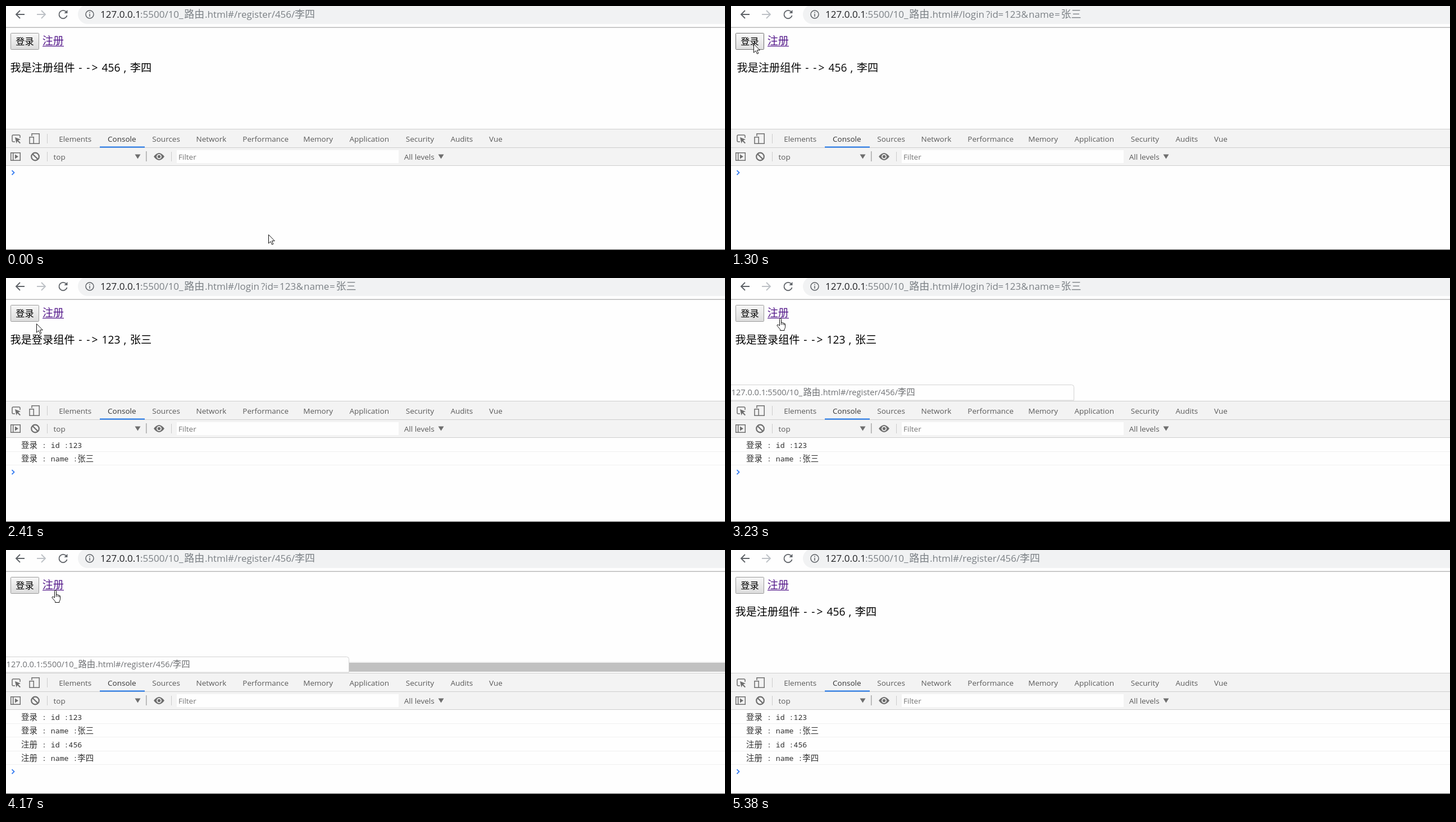
These frames come from a looping animation (1280x435 px, 5660 ms). An HTML page:

```html
<!DOCTYPE html>
<html lang="zh">
<head>
<meta charset="utf-8">
<title>路由</title>
<style>
html, body { margin: 0; width: 100%; height: 100%; overflow: hidden; background: #fefefe; }
svg { display: block; width: 1280px; height: 435px; }
text { font: 13.5px "Open Sans", "Noto Sans CJK SC", "Noto Sans CJK", sans-serif; fill: #5a5a5a; white-space: pre; }
text.zh { font-family: "Noto Sans CJK SC", "Noto Sans CJK", sans-serif; }
.url text { font-size: 17px; fill: #7b8085; }
.url .zh { font-size: 18px; }
.url .host { fill: #202124; }
#status text { fill: #6f7174; }
.page text { font-size: 19.2px; fill: #000; }
.log text { font: 13.2px "Noto Sans Mono", "Noto Sans CJK SC", monospace; fill: #303030; }
.log .zh { font-size: 14.4px; }
.icon { fill: none; stroke: #5f6368; stroke-width: 1.5; }
.tools { stroke: #6e6e6e; }
.solid { fill: #6e6e6e; }
.icon .solid { stroke: none; }
.sep { fill: #ccc; }
#button rect { fill: url(#idle); stroke: #9a9a9a; }
#button.hover rect { fill: url(#hover); stroke: #6f6f6f; }
#button.press rect { fill: url(#press); stroke: #6f6f6f; }
#button text { font-size: 16.2px; fill: #000; }
#link { fill: #551a8b; }
#link.press { fill: #f00; }
#link text { font-size: 19.2px; fill: inherit; }
.pointer { fill: #fff; stroke: #111; stroke-linejoin: round; }
.off { display: none; }
</style>
</head>
<body>
<svg viewBox="0 0 1280 435">
  <defs>
    <linearGradient id="idle" x2="0" y2="1"><stop stop-color="#f7f7f7"/><stop offset="1" stop-color="#dcdcdc"/></linearGradient>
    <linearGradient id="hover" x2="0" y2="1"><stop stop-color="#fafafa"/><stop offset="1" stop-color="#dedede"/></linearGradient>
    <linearGradient id="press" x2="0" y2="1"><stop stop-color="#d8d8d8"/><stop offset="1" stop-color="#f0f0f0"/></linearGradient>
  </defs>
  <rect width="1280" height="435" fill="#fefefe"/>

  <!-- browser bar -->
  <rect x="128" y="-2" width="1300" height="34" rx="17" fill="#f1f2f3"/>
  <rect y="37.5" width="1280" height="1.5" fill="#b9b9b9"/>
  <g class="icon">
    <path d="M33 15H18M25 8l-7 7 7 7" style="stroke-width:1.9"/>
    <path d="M55 15H70M63 8l7 7-7 7" style="stroke:#bdc1c6;stroke-width:1.9"/>
    <path d="M107 10.2A7.2 7.2 0 1 0 108.6 17" style="stroke-width:1.9"/>
    <path d="M109.5 7v6h-6z" style="fill:#5f6368;stroke:none"/>
    <circle cx="149" cy="15" r="7"/>
    <path d="M149 14v5M149 10.8v1.8"/>
  </g>
  <g id="barRegister" class="url"></g>
  <g id="barLogin" class="url"></g>

  <!-- page -->
  <g id="button">
    <rect x="8.5" y="48.5" width="50" height="29" rx="1"/>
    <text class="zh" x="17.3" y="69">登录</text>
  </g>
  <g id="link">
    <text class="zh" x="64.7" y="69">注册</text>
    <rect x="65" y="71" width="38" height="1.2"/>
  </g>
  <g id="panel" class="page">
    <text id="title" class="zh" x="7.5" y="117">我是注册组件</text>
    <text x="129.3" y="117">-</text>
    <text x="143.3" y="117">-</text>
    <text x="152.6" y="117">&gt;</text>
    <text id="number" x="170.5" y="117">456</text>
    <text x="209.5" y="117">,</text>
    <text id="person" class="zh" x="220.8" y="117">李四</text>
  </g>
  <g id="scrollbar">
    <rect y="199" width="1280" height="18" fill="#f1f1f1"/>
    <rect x="18" y="201" width="1262" height="16" fill="#c1c1c1"/>
    <path d="M11 204v10l-5-5z" fill="#a0a0a0"/>
  </g>
  <g id="status">
    <path d="M-1 190.5H606.5Q610.5 190.5 610.5 194.5V218H-1z" fill="#fefefe" stroke="#d2d2d2"/>
    <g id="bubble" class="url" transform="translate(-143.2 191.2) scale(.856)"></g>
  </g>

  <!-- developer tools -->
  <rect y="219" width="1280" height="66" fill="#f3f3f3"/>
  <path d="M0 219.5H1280M0 252.5H1280M0 284.5H1280" stroke="#cecece"/>
  <rect x="167" y="250.5" width="80" height="2" fill="#1a73e8"/>
  <g id="tabs"></g>
  <g class="icon tools">
    <path d="M16 242H13Q11 242 11 240V232Q11 230 13 230H23Q25 230 25 232V235"/>
    <path class="solid" d="M16 234l10 4-4.2 1.6L26 244l-1.5 1.3-4.2-4.3L18.5 245z"/>
    <path d="M46 232V227.8H59.2V245.2H50M42 233.8H49.2V245.2H42z"/>
    <path d="M8.7 261.7H25.3V275.3H8.7zM12.7 262V275"/>
    <path class="solid" d="M16 264.5v8l6-4z"/>
    <g style="stroke-width:2.2"><circle cx="52" cy="268.5" r="6.8"/><path d="M47.2 263.7l9.6 9.6"/></g>
  </g>
  <g class="sep">
    <rect x="73" y="228" width="1" height="17"/>
    <rect x="73" y="260" width="1" height="17"/>
    <rect x="249" y="259" width="1.5" height="18" fill="#aaa"/>
    <rect x="294" y="260" width="1" height="17"/>
  </g>
  <g class="solid">
    <path d="M229.5 264.5h10l-5 8z"/>
    <path d="M769.5 264.5h10l-5 8z"/>
    <path d="M263 268.5Q272.5 255.5 282 268.5 272.5 281.5 263 268.5z"/>
    <circle cx="272.5" cy="268.5" r="4.4" fill="#f3f3f3"/>
    <circle cx="272.5" cy="268.5" r="2.7"/>
  </g>
  <text x="84.5" y="273.5">top</text>
  <rect x="304" y="257" width="395" height="23" fill="#fefefe"/>
  <text x="307" y="274" style="fill:#757575">Filter</text>
  <text x="708.8" y="273.5">All levels</text>
  <g id="logs" class="log"></g>
  <path id="prompt" d="M10.5 293.2l4 3.9-4 3.9" fill="none" stroke="#367cf1" stroke-width="1.8"/>
  <rect y="434" width="1280" height="1" fill="#4c4c4c"/>

  <path id="arrow" class="pointer" d="M.5 .7V16.2L4 12.8 6.5 18.3 8.8 17.3 6.4 11.8H11.3z"/>
  <path id="hand" class="pointer" d="M5.5 14V2.5Q5.5 .7 7 .7T8.5 2.5V8.5Q10.3 7.3 11.3 9.3 13 8.3 13.8 10.2 15.5 9.7 15.5 12V16.5Q15.5 18.5 14 20.5V22.5H6.5V20.5L1.2 14.3Q.3 12.6 2.2 12.3 3.8 12.3 5.5 14zM8.5 8.5V12.5M11.3 9.5V12.5M13.8 10.5V13"/>
</svg>
<script>
const LOOP = 5660;
const SLIDE = 80; // distance over which a leaving or entering panel fades

// [time, x, y]; each pose is held until the next one
const pointer = [
  [0, 467, 407], [160, 417, 418], [310, 236, 264], [460, 171, 180], [580, 129, 124],
  [730, 54, 81], [880, 44, 72], [1030, 41, 69], [1150, 40, 67], [1720, 42, 69],
  [1840, 42, 72], [1990, 43, 73], [2140, 45, 75], [2260, 48, 77], [2410, 54, 81],
  [2530, 67, 79], [2650, 81, 76], [2800, 84, 76], [2950, 80, 72], [3230, 81, 71],
  [4440, 81, 69], [4560, 118, 80], [4680, 187, 103], [4830, 862, 368],
  [4980, 975, 380], [5100, 1030, 375], [5230, 1032, 370]
];
// [time, offset]
const slide = [
  [0, 0], [1300, 3], [1450, 52], [1570, 80], [1840, 49], [1990, 13], [2140, 1], [2260, 0],
  [3780, 6], [3900, 50], [4020, 80], [4320, 40], [4440, 14], [4560, 3], [4680, 0]
];
const buttonState = [[0, ''], [880, 'hover'], [1150, 'press'], [1300, 'hover'], [2410, '']];

const $ = id => document.getElementById(id);
const at = (track, t) => track.filter(step => step[0] <= t).pop();
const show = (id, on) => $(id).classList.toggle('off', !on);
const within = (t, from, to) => t >= from && t < to;
const label = (x, y, text, kind = '') => `<text class="${kind}" x="${x}" y="${y}">${text}</text>`;

// addresses
const address = (hostKind, route) =>
  [[168, '127.0.0.1', hostKind], [239, ':5500/10_'], [317.3, '路由', 'zh'], ...route]
    .map(([x, text, kind]) => label(x, 21, text, kind)).join('');
const registerRoute = [[354, '.html#/register/456/'], [514, '李四', 'zh']];
const loginRoute = [[354, '.html#/login'], [454, '?id'], [475.5, '='], [487, '123'],
  [516.5, '&amp;'], [530, 'name'], [576, '='], [587.5, '张三', 'zh']];
$('barRegister').innerHTML = address('host', registerRoute);
$('barLogin').innerHTML = address('host', loginRoute);
$('bubble').innerHTML = address('', registerRoute);

// developer tools
const tabs = { Elements: 94.2, Console: 181, Sources: 260.3, Network: 338.5, Performance: 421.3,
  Memory: 529.3, Application: 611.5, Security: 711.8, Audits: 791.5, Vue: 860 };
$('tabs').innerHTML = Object.entries(tabs).map(([name, x]) => label(x, 242, name)).join('');
$('tabs').children[1].style.fill = '#333';

const logs = [['登录', 'id', '123'], ['登录', 'name', '张三'], ['注册', 'id', '456'], ['注册', 'name', '李四']];
$('logs').innerHTML = logs.map(([route, key, value], i) => {
  const y = Math.round(303 + 24.4 * i);
  const middle = `: ${key} :`;
  return `<g id="log${i}">
    ${label(27, y, route, 'zh')}
    ${label(64, y, middle)}
    ${label(64 + middle.length * 7.92, y, value, key === 'name' ? 'zh' : '')}
    <rect y="${y + 6}" width="1280" height="1" fill="#f0f0f0"/></g>`;
}).join('');

function setPanel(login) {
  $('title').textContent = login ? '我是登录组件' : '我是注册组件';
  $('number').textContent = login ? '123' : '456';
  $('person').textContent = login ? '张三' : '李四';
}

function draw(now) {
  const t = now % LOOP;

  const loginUrl = within(t, 1300, 3780);
  show('barLogin', loginUrl);
  show('barRegister', !loginUrl);

  const offset = at(slide, t)[1];
  setPanel(within(t, 1570, 4020));
  $('panel').setAttribute('transform', `translate(${offset} 0)`);
  $('panel').setAttribute('opacity', 1 - offset / SLIDE);
  $('button').setAttribute('class', at(buttonState, t)[1]);
  $('link').setAttribute('class', within(t, 3630, 3780) ? 'press' : '');
  show('scrollbar', within(t, 1720, 2260) || within(t, 4170, 4680));
  show('status', within(t, 3230, 4980));

  const rows = t < 1840 ? 0 : t < 4170 ? 2 : 4;
  logs.forEach((_, i) => show('log' + i, i < rows));
  $('prompt').setAttribute('transform', `translate(0 ${rows * 24.5})`);

  const [, x, y] = at(pointer, t);
  const overLink = within(t, 2950, 4560);
  show('hand', overLink);
  show('arrow', !overLink && t < 5380);
  for (const id of ['hand', 'arrow']) $(id).setAttribute('transform', `translate(${x} ${y})`);
}

function tick(now) {
  draw(now);
  requestAnimationFrame(tick);
}
draw(0);
requestAnimationFrame(tick);
</script>
</body>
</html>
```
